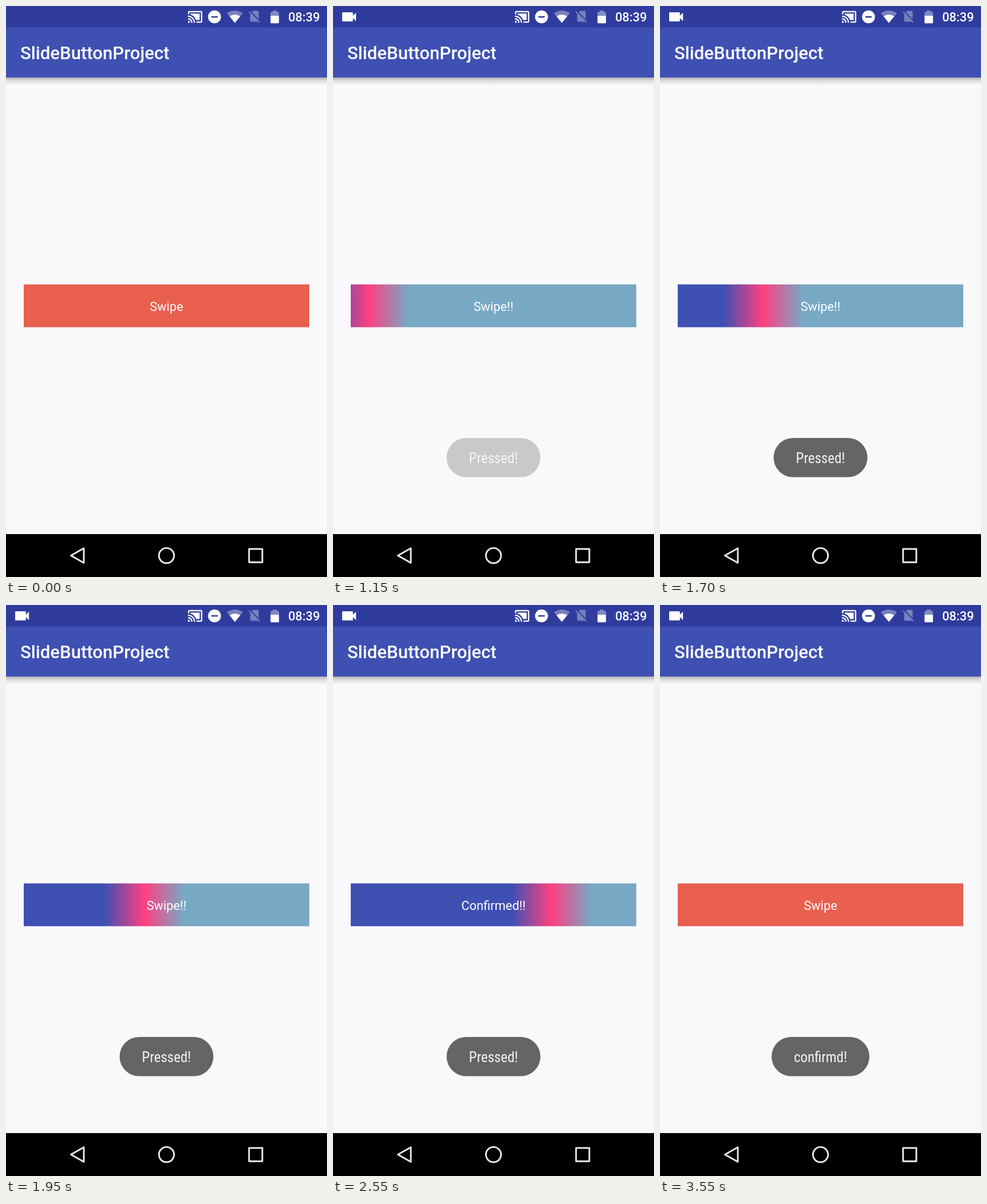
Recreate the animation shown at these times as an HTML page. Size 561 px wide and 998 px high, loop 3.7 s.

```html
<!DOCTYPE html>
<html lang="en">
<head>
<meta charset="utf-8">
<title>Slide button</title>
<style>
  html, body { margin: 0; width: 100%; height: 100%; overflow: hidden; background: #f9f8fb; }
  svg { display: block; width: 561px; height: 998px; }
  text { font-family: Roboto, sans-serif; fill: #fff; }
  .medium { font-weight: 500; }
  .center { text-anchor: middle; }
  .toast text { font: 24.93px "Roboto Condensed", Roboto, sans-serif; font-stretch: 75%; fill: #f3f3f3; }
  .toast rect { fill: #656565; }
</style>
</head>
<body>
<svg viewBox="0 0 561 998">
  <defs>
    <linearGradient id="slide" gradientUnits="userSpaceOnUse">
      <stop offset="0" stop-color="#3f50b3"/>
      <stop offset=".5" stop-color="#ff4081"/>
      <stop offset="1" stop-color="#77a8c4"/>
    </linearGradient>
    <linearGradient id="shade" x2="0" y2="1">
      <stop offset="0" stop-opacity=".28"/>
      <stop offset=".45" stop-opacity=".1"/>
      <stop offset="1" stop-opacity="0"/>
    </linearGradient>
  </defs>

  <rect width="561" height="998" fill="#f9f8fb"/>
  <rect y="125" width="561" height="14" fill="url(#shade)"/>
  <rect y="37" width="561" height="88" fill="#3f50b3"/>
  <rect width="561" height="37.5" fill="#303c9d"/>
  <text class="medium" x="24.9" y="93.2" font-size="31.17">SlideButtonProject</text>

  <!-- status bar -->
  <g fill="#fff">
    <path id="camera" transform="translate(12 3) scale(1.34)" d="M17 10.5V7c0-.55-.45-1-1-1H4c-.55 0-1 .45-1 1v10c0 .55.45 1 1 1h12c.55 0 1-.45 1-1v-3.5l4 4v-11l-4 4z"/>
    <path transform="translate(316.9 5.3) scale(1.136)" d="M1 18v3h3c0-1.66-1.34-3-3-3zm0-4v2c2.76 0 5 2.24 5 5h2c0-3.87-3.13-7-7-7zm18-7H5v1.63c3.96 1.28 7.09 4.41 8.37 8.37H19V7zM1 10v2c4.97 0 9 4.03 9 9h2c0-6.08-4.93-11-11-11zm20-7H3c-1.1 0-2 .9-2 2v3h2V5h18v14h-7v2h7c1.1 0 2-.9 2-2V5c0-1.1-.9-2-2-2z"/>
    <circle cx="364.4" cy="19" r="11.3"/>
    <path fill="#303c9d" d="M358.8 17.8h11.2v2.5h-11.2z"/>
    <path opacity=".35" d="M400 29.5L386 12.4Q400 3.4 414 12.4z"/>
    <path d="M400 29.5L390.6 18Q400 12 409.4 18z"/>
    <path opacity=".35" transform="translate(421.4 5.2) scale(1.06)" d="M18.99 5c0-1.1-.89-2-1.99-2h-7L7.66 5.34 19 16.68 18.99 5zM3.65 3.88L2.38 5.15 5 7.77V19c0 1.1.9 2 2 2h10.01c.35 0 .67-.1.96-.26l1.88 1.88 1.27-1.27L3.65 3.88z"/>
    <path opacity=".4" d="M462.3 17v-5.4q0-1.2 1.2-1.2h2.6V8h7.2v2.4h2.6q1.2 0 1.2 1.2V17z"/>
    <path d="M462.3 17h14.8v12q0 1.2-1.2 1.2h-12.4q-1.2 0-1.2-1.2z"/>
  </g>
  <text class="medium" x="548.6" y="27" font-size="21.82" text-anchor="end">08:39</text>

  <!-- slide button -->
  <rect id="button" x="31" y="486.6" width="499" height="74.8"/>
  <text id="label" class="center" x="280.5" y="532.5" font-size="21.82"></text>

  <g class="toast" id="pressed">
    <rect x="198.5" y="755" width="164" height="68.5" rx="34.2"/>
    <text class="center" x="280.5" y="798.6">Pressed!</text>
  </g>
  <g class="toast" id="confirmed">
    <rect x="195" y="755" width="171" height="68.5" rx="34.2"/>
    <text class="center" x="280.5" y="798.6">confirmd!</text>
  </g>

  <!-- navigation bar -->
  <rect y="923" width="561" height="75"/>
  <g fill="none" stroke="#ebebeb" stroke-width="2.9" stroke-linejoin="round">
    <path d="M113.5 960.5L136 947.7V973.3z"/>
    <circle cx="280.5" cy="960.6" r="13.2"/>
    <rect x="424.8" y="949" width="23.2" height="23.2"/>
  </g>
</svg>
<script>
const LOOP = 3700, STEP = 50;
const PRESS = 900, DRAG = 950, CONFIRM = 2550, RELEASE = 3100;
const $ = id => document.getElementById(id);
const clamp = v => Math.min(1, Math.max(0, v));

// finger position: [time, x]
const swipe = [[1000, 37], [1350, 96], [1700, 180], [2200, 303], [CONFIRM, 382]];

function fingerX(t) {
  if (t <= swipe[0][0]) return swipe[0][1];
  for (let i = 1; i < swipe.length; i++) {
    const [t0, x0] = swipe[i - 1], [t1, x1] = swipe[i];
    if (t <= t1) return x0 + (x1 - x0) * (t - t0) / (t1 - t0);
  }
  return swipe.at(-1)[1];
}

const fadeIn = (t, start) => 1 - (1 - clamp((t - start) / 400)) ** 2;
const fadeOut = (t, start) => 1 - clamp((t - start) / 340) ** 2;

function draw(now) {
  const t = Math.floor(now % LOOP / STEP) * STEP;
  const held = t >= PRESS && t < RELEASE;
  const dragged = t >= DRAG && t < RELEASE;
  const x = fingerX(t);

  $("camera").setAttribute("opacity", t >= 100 ? 1 : 0);
  $("slide").setAttribute("x1", x - 69);
  $("slide").setAttribute("x2", x + 69);
  $("button").setAttribute("fill", dragged ? "url(#slide)" : "#e9604f");
  $("label").textContent = !held ? "Swipe" : t < CONFIRM ? "Swipe!!" : "Confirmed!!";
  $("pressed").setAttribute("opacity", fadeIn(t, 1080) * fadeOut(t, 3060));
  $("confirmed").setAttribute("opacity", fadeIn(t, 3080));
}

const start = performance.now();
function tick() {
  draw(performance.now() - start);
  requestAnimationFrame(tick);
}
tick();
</script>
</body>
</html>
```
